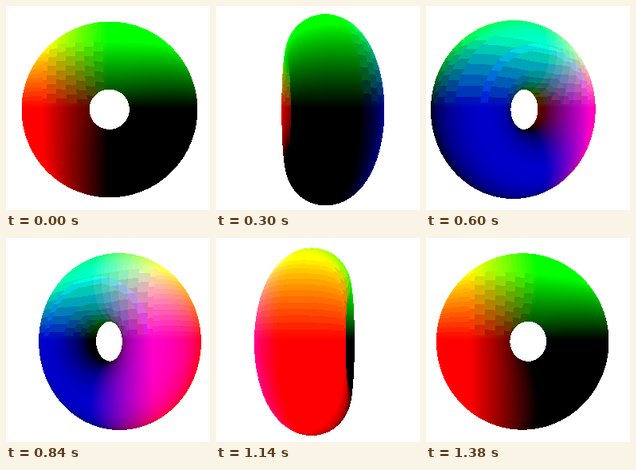
Recreate the animation shown at these times as an HTML page with a canvas. Size 256 px wide and 256 px high, loop 1.44 s.

```html
<!DOCTYPE html>
<html lang="en">
<head>
<meta charset="utf-8">
<title>Turning torus</title>
<style>
  html, body { margin: 0; width: 100%; height: 100%; overflow: hidden; background: #fff; }
  canvas { display: block; width: 256px; height: 256px; image-rendering: pixelated; }
</style>
</head>
<body>
<canvas id="stage" width="256" height="256"></canvas>
<script>
const SIZE = 256, STEPS = 24, STEP_MS = 60;
const FOCAL = SIZE / 2 / Math.tan(Math.PI / 6);   // 60 degree field of view

// Lengths are in units of the camera distance.
const RING = 0.294, TUBE = 0.18;
const CENTRE = { x: 0.008, y: -0.008, z: -0.005 };
const FULL = 0.305, FULL_DEPTH = 0.222;           // coordinates of full colour
const BAND = 255 / 7;

const ctx = document.getElementById('stage').getContext('2d');
const cache = [];

const level = (v, full) => 255 * Math.min(1, Math.max(0, v / full));

function band(v, size, shift = 0) {
  return Math.min(255, Math.max(0, (Math.round(v / size + shift) - shift) * size));
}

// Colour follows the position on the body; mixed hues fall into cells,
// finer ones where a channel is already full.
function shade(x, y, z) {
  const r = level(-x, FULL), g = level(y, FULL), b = level(z, FULL_DEPTH);
  const side = Math.max(r, b);
  if (Math.min(g, side) < BAND / 2) return [r, g, b];
  const size = Math.max(g, side) < 255 ? BAND : BAND / 2;
  const shift = Math.round(side / size) % 2 / 2;
  return [band(r, size), g < 255 ? band(g, size, shift) : g, band(b, size)];
}

// Walks a ray towards the torus; returns the distance, or -1 for a miss.
function trace(ox, oy, oz, dx, dy, dz) {
  let t = 0.4;
  for (let i = 0; i < 400 && t < 1.7; i++) {
    const x = ox + dx * t, y = oy + dy * t, z = oz + dz * t;
    const q = Math.sqrt(x * x + y * y) - RING;
    const d = Math.sqrt(q * q + z * z) - TUBE;
    if (d < 0.0003) return t;
    t += d;
  }
  return -1;
}

function render(step) {
  const angle = step / STEPS * 2 * Math.PI;
  const c = Math.cos(angle), s = Math.sin(angle);
  const image = ctx.createImageData(SIZE, SIZE);
  const data = image.data.fill(255);
  const ex = s, ez = -c;                          // eye, seen from the body

  for (let py = 0; py < SIZE; py++) {
    for (let px = 0; px < SIZE; px++) {
      const u = (px + 0.5 - SIZE / 2) / FOCAL;
      const v = (SIZE / 2 - py - 0.5) / FOCAL;
      if (u * u + v * v > 0.36) continue;
      const n = 1 / Math.sqrt(u * u + v * v + 1);
      const dx = (u * c - s) * n, dy = v * n, dz = (u * s + c) * n;
      const t = trace(ex - CENTRE.x, -CENTRE.y, ez - CENTRE.z, dx, dy, dz);
      if (t < 0) continue;
      data.set(shade(ex + dx * t, dy * t, ez + dz * t), (py * SIZE + px) * 4);
    }
  }
  return image;
}

let shown = -1;
const start = performance.now();

function draw() {
  const step = Math.floor((performance.now() - start) / STEP_MS) % STEPS;
  if (step !== shown) {
    ctx.putImageData(cache[step] || (cache[step] = render(step)), 0, 0);
    shown = step;
  }
  requestAnimationFrame(draw);
}
draw();
</script>
</body>
</html>
```
